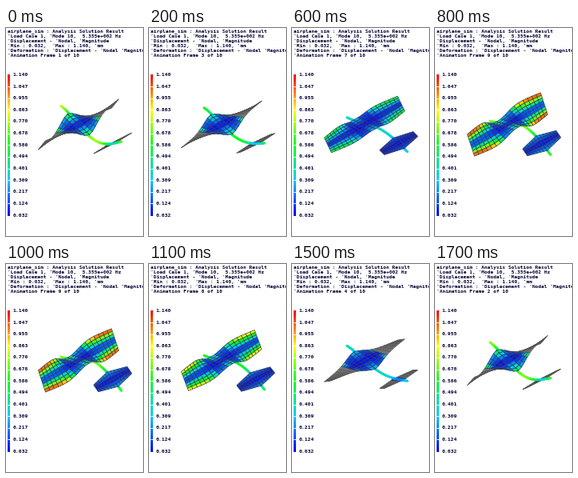
Animation of 172 by 260 pixels, one loop 1800 ms. Source, as a matplotlib script:

```python
import numpy as np
import matplotlib.pyplot as plt
from matplotlib.animation import FuncAnimation
from matplotlib.collections import LineCollection, PolyCollection
from matplotlib.colors import LinearSegmentedColormap, Normalize

W, H, DPI = 172, 260, 100
PX = 72 / DPI
STEPS = 10
LOW, HIGH = 0.032, 1.1396

cmap = LinearSegmentedColormap.from_list(
    "rainbow5", ["#0000ff", "#00ccff", "#00ff20", "#ffff00", "#ff0000"])
norm = Normalize(LOW, HIGH)

fig = plt.figure(figsize=(W / DPI, H / DPI), dpi=DPI, facecolor="white")
ax = fig.add_axes([0, 0, 1, 1])


def label(x, y, text, size=6.13):
    return ax.text(x, y, text, family="DejaVu Sans Mono", fontsize=size * PX,
                   weight="bold", color="#000030", va="center", ha="left")


# Header
header = [
    "airplane_sim : Analysis Solution Result",
    "'Load Case 1, 'Mode 10,  5.355e+002 Hz",
    "'Displacement - 'Nodal, 'Magnitude",
    "'Min : 0.032,  'Max : 1.140, 'mm",
    "'Deformation : 'Displacement - 'Nodal 'Magnitude",
]
for row, text in enumerate(header):
    label(1.5, 3.9 + 6.15 * row, text)
counter = label(1.5, 34.7, "")

# Colour scale
ax.imshow(np.linspace(1, 0, 177)[:, None], cmap=cmap, vmin=0, vmax=1,
          extent=(2, 5, 235, 58), aspect="auto", interpolation="nearest")
ticks = np.linspace(58.5, 234, 13)
for y, value in zip(ticks, np.linspace(HIGH, LOW, 13)):
    label(8.5, y, f"{value:.3f}", 6.4)
ax.hlines(ticks[1:-1], 2, 5, color="white", linewidth=PX)

ax.set_xlim(0, W)
ax.set_ylim(H, 0)
ax.axis("off")

# Bending shape of the fuselage, nose to tail
bend = np.polyfit([0, 0.3, 0.6, 0.86, 1], [9.5, -2, -9, 0, 8.5], 4)
u = np.linspace(0, 1, 60)


def surface(centre, half_span, root, tip, twist, amp, cells):
    """Quads of a tapered, twisted plate with their span and displacement."""
    ns, nc = cells
    s, c = np.meshgrid(np.linspace(-1, 1, ns + 1), np.linspace(-1, 1, nc + 1),
                       indexing="ij")
    k = np.abs(s)
    tw = twist(k)
    x = centre[0] + s * half_span[0] + c * (root[0] + (tip[0] - root[0]) * k)
    y = centre[1] + s * half_span[1] + c * (
        root[1] + (tip[1] - root[1]) * k + amp * tw)
    p = np.stack([x, y], -1)
    quads = np.stack([p[:-1, :-1], p[1:, :-1], p[1:, 1:], p[:-1, 1:]], 2)

    def mid(v):
        return (v[:-1, :-1] + v[1:, :-1] + v[1:, 1:] + v[:-1, 1:]).ravel() / 4

    return quads.reshape(-1, 4, 2), mid(k), mid(np.abs(c * tw * amp))


def wing(amp):
    return surface((91, 120.5), (46, -26), (14, 8), (4.5, 4.3),
                   lambda k: -5 + 15 * (1 - np.exp(-(k / 0.33) ** 2)),
                   amp, (20, 8))


def tail(amp):
    return surface((134, 144), (21, -11.5), (7, 3.5), (3, 1.5),
                   lambda k: 6 - 3 * k, amp, (12, 6))


def plate(zorder):
    return ax.add_collection(
        PolyCollection([], linewidths=0.65 * PX, zorder=zorder), autolim=False)


wing_mesh = plate(3)
tail_mesh = plate(1)
body = ax.add_collection(
    LineCollection([], linewidths=3 * PX, capstyle="round", zorder=2),
    autolim=False)


def paint(mesh, shape, amp, scale, core):
    quads, k, size = shape
    colors = cmap(norm(LOW + size * scale))
    edges = np.tile([0.2, 0.22, 0.3, 1.0], (len(quads), 1))
    # The underside of the outer panels is uncoloured
    if amp < 0:
        colors[k > core] = (0.52, 0.52, 0.52, 1)
        edges[k > core] = (0.34, 0.34, 0.34, 1)
    mesh.set_verts(quads)
    mesh.set_facecolor(colors)
    mesh.set_edgecolor(edges)


def draw(i):
    step = i if i < STEPS else 2 * (STEPS - 1) - i
    amp = -np.cos(np.pi * step / (STEPS - 1))
    counter.set_text(f"'Animation Frame {step + 1} of {STEPS}")

    paint(wing_mesh, wing(amp), amp, 0.12, 0.36)
    paint(tail_mesh, tail(amp), amp, 0.045, 0.15)
    tail_mesh.set_zorder(1 if amp < 0 else 4)

    w = np.polyval(bend, u)
    p = np.stack([69 + 76 * u, 107 + 43.5 * u + amp * w], -1)
    body.set_segments(np.stack([p[:-1], p[1:]], 1))
    size = np.hypot(w, 5)[:-1] * 0.07 * abs(amp)
    body.set_color(cmap(norm(LOW + size)))
    return counter, wing_mesh, tail_mesh, body


anim = FuncAnimation(fig, draw, frames=2 * (STEPS - 1), interval=100,
                     repeat=True, repeat_delay=0, blit=False)
plt.show()
```
